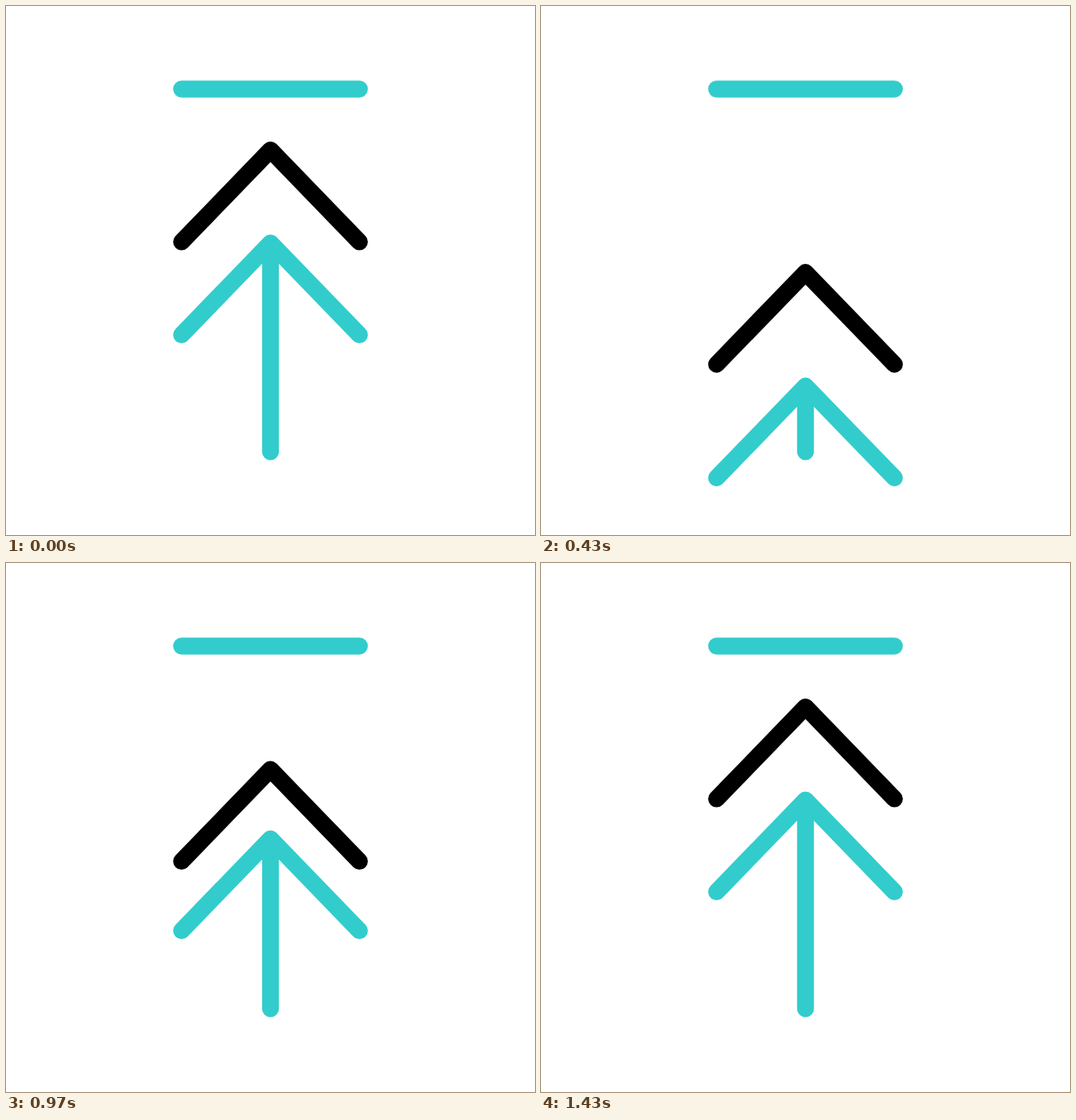
Recreate the animation shown at these times as an HTML page. Size 640 by 640 pixels, loop 2000 ms.

```html
<!DOCTYPE html>
<html>
<head>
<meta charset="utf-8">
<style>
  html, body { margin: 0; height: 100%; overflow: hidden; background: #fff; }
  svg { display: block; width: 100vw; height: 100vh; }
  path { fill: none; stroke: #3cc; stroke-width: 20.4; stroke-linecap: round; stroke-linejoin: round; }
  #chevron { stroke: #000; }
</style>
</head>
<body>
<svg viewBox="0 0 640 640">
  <path d="M212.4 100.5H427.6"/>
  <path id="chevron"/>
  <path id="arrow"/>
</svg>
<script>
const LOOP = 2000, FPS = 30, END = 43;
const chevron = document.getElementById('chevron');
const arrow = document.getElementById('arrow');

// Ease from 0 to 1 between two frames; easeOut and easeIn are the bezier handle positions
function ease(frame, start, end, easeOut = 1 / 3, easeIn = 2 / 3) {
  const u = Math.min(1, Math.max(0, (frame - start) / (end - start)));
  let low = 0, high = 1, s;
  for (let i = 0; i < 20; i++) {
    s = (low + high) / 2;
    const r = 1 - s;
    const x = 3 * s * r * r * easeOut + 3 * s * s * r * easeIn + s ** 3;
    if (x < u) low = s; else high = s;
  }
  return s * s * (3 - 2 * s);
}

// The chevron sinks and slowly returns
const chevronDrop = f => 160 * (ease(f, 0, 15, 0.5, 0.73) - ease(f, 15, END, 0.17, 0.77));

// The arrow sinks, springs back to a rest, then finishes its rise
const arrowDrop = f => 182 * ease(f, 0, 15) - 135 * ease(f, 15, 20.6) - 47 * ease(f, 34.6, END);

const head = y => `M212.4 ${y + 111.2}L320 ${y}L427.6 ${y + 111.2}`;

function draw() {
  const time = performance.now() % LOOP;
  const frame = Math.floor((time + 4) * FPS / 1000) % (LOOP * FPS / 1000);
  const tip = 286.6 + arrowDrop(frame);
  chevron.setAttribute('d', head(174.2 + chevronDrop(frame)));
  arrow.setAttribute('d', `${head(tip)}M320 ${tip}V539.4`);
  requestAnimationFrame(draw);
}
draw();
</script>
</body>
</html>
```
